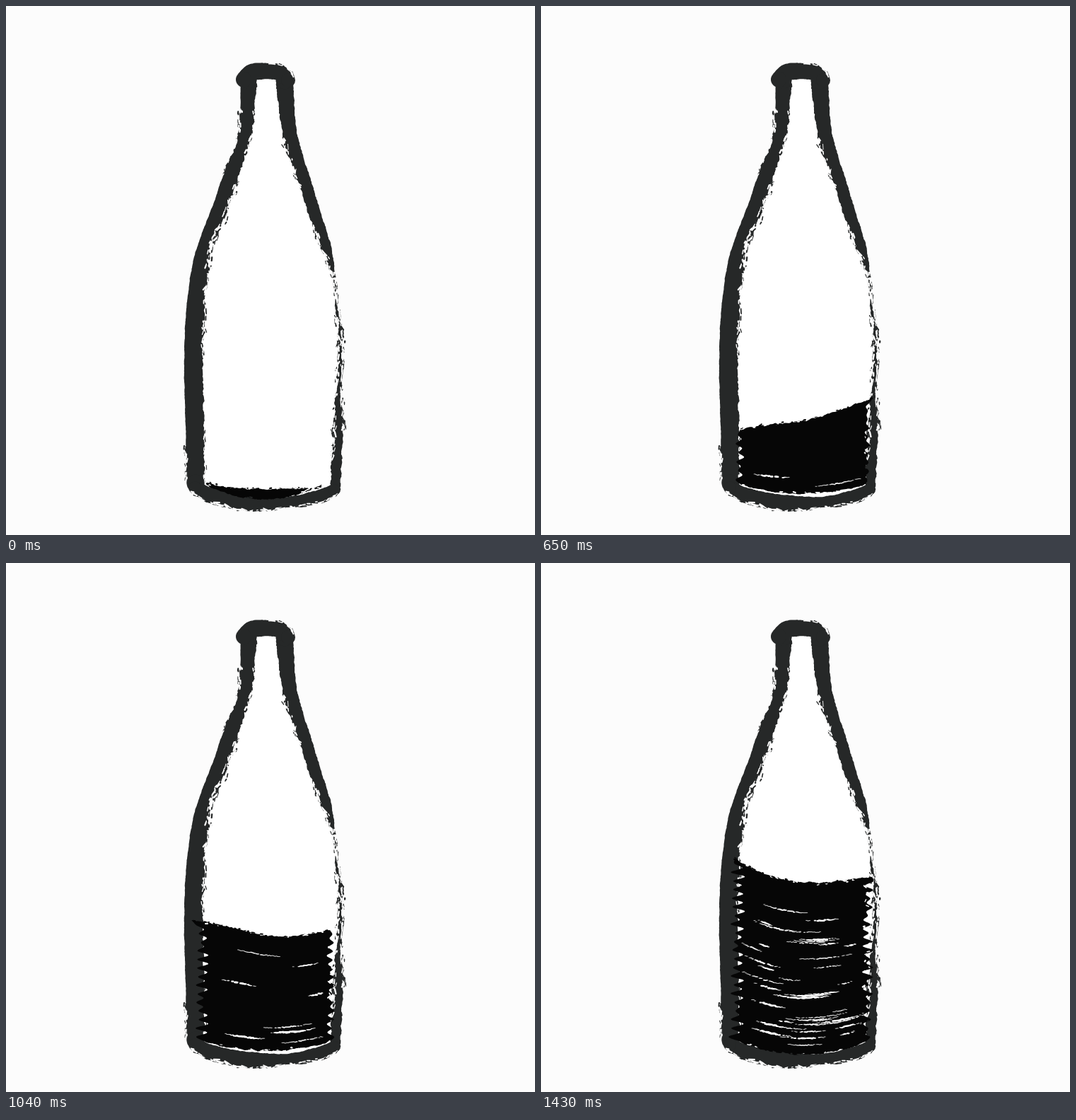
An HTML page with a canvas that plays this animation: 748 px wide and 748 px high, repeating every 1.69 s.

```html
<!DOCTYPE html>
<html lang="en">
<head>
<meta charset="utf-8">
<title>Filling bottle</title>
<style>
html, body { margin: 0; width: 100%; height: 100%; overflow: hidden; background: #fcfcfc; }
canvas { display: block; width: 100vmin; height: 100vmin; }
</style>
</head>
<body>
<canvas id="stage" width="748" height="748"></canvas>
<script>
const SIZE = 748, LOOP = 1690, HOLD = 260, STEP = 130;
const PAPER = '#fcfcfc', HOLLOW = '#ffffff', GLASS = '#262828', INK = '#060606';
const stage = document.getElementById('stage').getContext('2d');
let ctx, seed;

function rnd() {
  seed = (seed + 0x6D2B79F5) | 0;
  let t = Math.imul(seed ^ (seed >>> 15), 1 | seed);
  t = (t + Math.imul(t ^ (t >>> 7), 61 | t)) ^ t;
  return ((t ^ (t >>> 14)) >>> 0) / 4294967296;
}
const range = (a, b) => a + (b - a) * rnd();
const mix = (a, b, t) => a + (b - a) * t;

function makeLayer(color, start, draw) {
  const c = document.createElement('canvas');
  c.width = c.height = SIZE;
  ctx = c.getContext('2d');
  ctx.fillStyle = ctx.strokeStyle = color;
  ctx.lineCap = 'round';
  seed = start;
  draw();
  return c;
}

// Smooth path through key points, sampled about every 2 px.
function curve(keys) {
  const last = keys.length - 1, out = [];
  const at = i => keys[Math.max(0, Math.min(last, i))];
  for (let i = 0; i < last; i++) {
    const a = at(i - 1), b = at(i), c = at(i + 1), d = at(i + 2);
    const n = Math.ceil(Math.hypot(c[0] - b[0], c[1] - b[1]) / 2) || 1;
    for (let j = 0; j < n; j++) {
      const t = j / n;
      out.push(b.map((v, k) => v + 0.5 * t * (c[k] - a[k] +
        t * (2 * a[k] - 5 * v + 4 * c[k] - d[k] +
        t * (3 * (v - c[k]) + d[k] - a[k])))));
    }
  }
  out.push(at(last));
  return out;
}

function normal(pts, i) {
  const a = pts[Math.max(0, i - 1)], b = pts[Math.min(pts.length - 1, i + 1)];
  const l = Math.hypot(b[0] - a[0], b[1] - a[1]) || 1;
  return [(a[1] - b[1]) / l, (b[0] - a[0]) / l];
}

// Shift a path sideways by half its width, with a wandering edge.
function side(pts, sign, amp) {
  let v = 0;
  return pts.map((p, i) => {
    v = v * 0.6 + range(-amp, amp);
    const n = normal(pts, i), o = sign * (p[2] || 0) / 2 + v;
    return [p[0] + n[0] * o, p[1] + n[1] * o];
  });
}

function fill(pts) {
  ctx.beginPath();
  for (const p of pts) ctx.lineTo(p[0], p[1]);
  ctx.fill();
}

function erase(draw) {
  ctx.globalCompositeOperation = 'destination-out';
  draw();
  ctx.globalCompositeOperation = 'source-over';
}

// One stroke of a wide brush with round ends; keys are [x, y, width].
function brush(keys, ampA, ampB) {
  const pts = curve(keys), a = side(pts, 1, ampA), b = side(pts, -1, ampB);
  fill([...a, ...b.slice().reverse()]);
  for (const [x, y, w] of [keys[0], keys[keys.length - 1]]) {
    ctx.beginPath();
    ctx.arc(x, y, w / 2, 0, 7);
    ctx.fill();
  }
  return { a, b };
}

// Short dashes along a path, per pixel of its length.
function flecks(pts, density, spread, len) {
  for (let k = pts.length * 2 * density; k > 0; k--) {
    const i = Math.floor(rnd() * pts.length), n = normal(pts, i);
    const o = range(-spread, spread) * rnd(), l = len * range(0.1, 0.5), tilt = range(-0.3, 0.3);
    const x = pts[i][0] + n[0] * o, y = pts[i][1] + n[1] * o;
    const dx = (n[1] + n[0] * tilt) * l, dy = (n[1] * tilt - n[0]) * l;
    ctx.lineWidth = range(0.8, 2.4);
    ctx.beginPath();
    ctx.moveTo(x - dx, y - dy);
    ctx.lineTo(x + dx, y + dy);
    ctx.stroke();
  }
}

function dry(pts, density, spread, len, y0 = 0, y1 = SIZE) {
  const part = pts.filter(p => p[1] > y0 && p[1] < y1);
  flecks(part, density, spread, len);
  erase(() => flecks(part, density, spread, len));
}

function drawBottle() {
  const left = brush([[343, 105, 23], [341, 150, 20], [335, 192, 18], [319, 235, 20], [303, 285, 22],
    [283, 330, 17], [274, 370, 22], [267, 440, 26], [265, 520, 26], [267, 600, 26], [268, 675, 25]], 0.3, 0.9);
  const neck = brush([[394, 105, 25], [397, 145, 22], [402, 185, 20], [418, 235, 18],
    [434, 285, 17], [453, 340, 13], [464, 382, 4]], 0.9, 0.5);
  const right = brush([[466, 390, 1], [470, 440, 4], [473, 490, 6], [471, 530, 7], [470, 570, 10],
    [470, 610, 14], [467, 650, 14], [466, 684, 14]], 0.9, 0.9);
  const base = brush([[267, 681, 18], [300, 694, 20], [350, 703, 22], [400, 701, 15],
    [440, 694, 18], [464, 684, 16]], 0.7, 0.4);
  const cap = brush([[336, 104, 22], [348, 94, 24], [368, 92, 23], [388, 95, 22], [399, 105, 20]], 0.3, 0.3);

  dry(left.b, 0.22, 4, 7, 150, 500);
  dry(left.b, 0.4, 7, 8, 275, 375);
  dry(left.b, 0.15, 3, 6, 600, 672);
  dry(left.a, 0.2, 3, 6, 145, 250);
  dry(left.a, 0.25, 3, 7, 622, 670);
  dry(neck.a, 0.3, 4, 8, 185, 255);
  dry(neck.a, 0.35, 4, 8, 310, 382);
  dry(right.a, 0.3, 4, 7, 390, 640);
  dry(right.b, 0.4, 4, 8, 390, 605);
  dry(base.a, 0.25, 3, 9);
  dry(cap.b.filter(p => p[0] > 370), 0.2, 2, 9);
}

// Ink surface from key points, bowl-shaped floor, ragged brush ends on both sides.
function drawInk({ top, drop = 0, reach = 0, streaks = 0 }) {
  const surface = curve(top);
  const x0 = Math.max(280, top[0][0]), x1 = Math.min(460, top[top.length - 1][0]);
  const surfaceAt = x => (surface.find(p => p[0] >= x) || surface[surface.length - 1])[1];
  const floorAt = x => 676 + (14 + drop) * Math.pow(Math.max(0, Math.sin(Math.PI * (x - x0) / (x1 - x0))), 0.8);

  const teeth = (x, out, from, to) => {
    const n = Math.floor(Math.abs(to - from) / 6), keys = [];
    for (let k = 1; k < n; k++) {
      keys.push([x + out * (k % 2 ? range(0.2, 1) : range(-0.6, 0.1)), mix(from, to, k / n)]);
    }
    return keys;
  };
  const floor = [];
  for (let x = x1; x >= x0; x -= 2) floor.push([x, floorAt(x)]);
  const corner = [x0, 676], end = top[top.length - 1];
  const rightEnds = curve([end, ...teeth(x1, reach * 0.7, end[1], 676), floor[0]]);
  const leftEnds = curve([corner, ...teeth(x0, -reach, 676, top[0][1]), top[0]]);
  const bed = side(floor, 0, 0.7);
  fill([...side(surface, 0, 0.7), ...rightEnds, ...bed, ...leftEnds]);

  erase(() => {
    flecks(surface, 0.12, 4, 3);
    flecks(bed, 0.12, 4, 4);
    flecks(rightEnds, 0.06, 4, 4);
    for (let k = 0; k < streaks; k++) scrape();
  });
  flecks(surface, 0.12, 2.5, 3);

  // A dry streak that runs between the shape of the surface and that of the floor.
  function scrape() {
    const len = range(15, 75), v = Math.sqrt(range(0.03, 0.9)), w = range(1, 2.8);
    const from = rnd() < 0.4 ? range(x0, x0 + 70) : x1 - len - range(0, 60);
    for (let x = from; x < from + len; x += 2) {
      if (rnd() < 0.2) continue;
      const y = mix(surfaceAt(x), floorAt(x), v) + range(-0.6, 0.6);
      ctx.lineWidth = Math.max(0.7, w * Math.sin(Math.PI * (x - from + 1) / (len + 2)));
      ctx.beginPath();
      ctx.moveTo(x, y);
      ctx.lineTo(x + 2, y);
      ctx.stroke();
    }
  }
}

const levels = [
  { top: [[283, 674], [330, 682], [446, 682]], drop: 8 },
  { top: [[276, 650], [350, 656], [460, 643]], reach: 5, streaks: 2 },
  { top: [[270, 613], [300, 613], [370, 626], [460, 645]], reach: 7, streaks: 4 },
  { top: [[276, 594], [360, 604], [465, 588]], reach: 9, streaks: 3 },
  { top: [[282, 600], [300, 595], [385, 583], [468, 554]], reach: 9, streaks: 2 },
  { top: [[272, 572], [370, 569], [468, 545]], reach: 11, streaks: 4 },
  { top: [[280, 533], [330, 551], [385, 560], [472, 561]], reach: 12, streaks: 6 },
  { top: [[264, 506], [300, 511], [385, 528], [458, 519]], reach: 12, streaks: 9 },
  { top: [[268, 493], [360, 504], [468, 487]], reach: 13, streaks: 9 },
  { top: [[264, 503], [330, 497], [420, 479], [472, 455]], reach: 13, streaks: 11 },
  { top: [[274, 419], [330, 444], [390, 452], [468, 444]], drop: 5, reach: 15, streaks: 44 }
];

const hollow = makeLayer(HOLLOW, 1, () => fill(curve([[343, 100], [335, 192], [283, 330], [267, 440],
  [268, 680], [350, 700], [464, 684], [471, 530], [466, 390], [418, 235], [394, 100]])));
const bottle = makeLayer(GLASS, 11, drawBottle);
const inks = levels.map((level, i) => makeLayer(INK, 100 + i * 37, () => drawInk(level)));

let shown = -1;
const start = performance.now();

function frame() {
  const t = (performance.now() - start) % LOOP;
  const k = t < HOLD ? 0 : Math.min(levels.length - 1, 1 + Math.floor((t - HOLD) / STEP));
  if (k !== shown) {
    shown = k;
    stage.fillStyle = PAPER;
    stage.fillRect(0, 0, SIZE, SIZE);
    for (const layer of [hollow, bottle, inks[k]]) stage.drawImage(layer, 0, 0);
  }
  requestAnimationFrame(frame);
}
frame();
</script>
</body>
</html>
```
